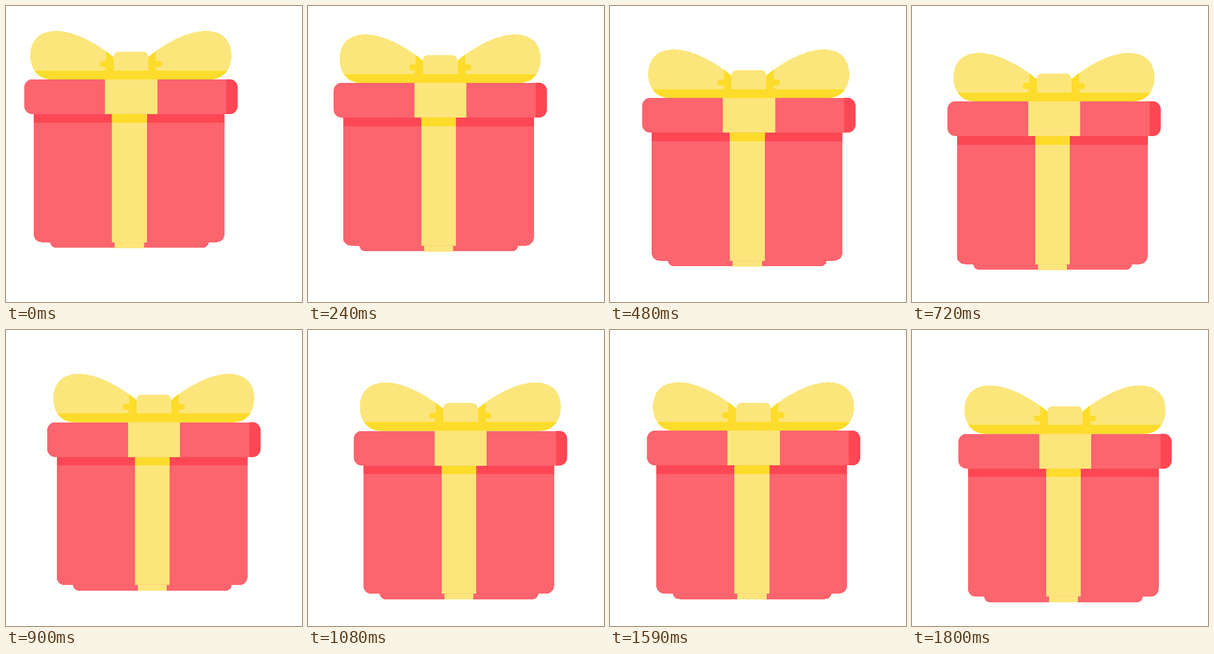
An HTML page that plays this animation: 512 px wide and 512 px high, repeating every 1.83 s.

```html
<!DOCTYPE html>
<html lang="en">
<head>
<meta charset="utf-8">
<title>Gift box</title>
<style>
  html, body { margin: 0; width: 100%; height: 100%; overflow: hidden; background: #fff; }
  svg { display: block; width: 100vw; height: 100vh; shape-rendering: crispEdges; }
  .red { fill: #fc646e; }
  .deep-red { fill: #fd4754; }
  .gold { fill: #fce67c; }
  .deep-gold { fill: #fddc2b; }
  .seam { fill: none; stroke: #fcd578; stroke-width: 1; }
</style>
</head>
<body>
<svg viewBox="0 0 512 512">
  <defs>
    <path id="loop" d="M218 127H79C55 127 42 108 42 86C42 60 57 43 87 43C119 43 161 67 186 88.500L218 100Z"/>
    <clipPath id="loopClip"><use href="#loop"/></clipPath>
    <clipPath id="lidClip"><rect x="31.600" y="126.800" width="369" height="60.200" rx="14"/></clipPath>
    <g id="wing">
      <use href="#loop" class="gold"/>
      <g clip-path="url(#loopClip)" class="deep-gold">
        <rect x="40" y="111.600" width="180" height="16"/>
        <path d="M173 70H187V113H168Q173 111 173 106Z"/>
        <rect x="162" y="95" width="24" height="10.500" rx="5"/>
      </g>
    </g>
  </defs>
  <g id="gift">
    <path class="red" d="M76 405H351Q351 418.300 339 418.300H88Q76 418.300 76 405Z"/>
    <rect class="red" x="48" y="160" width="330" height="248.600" rx="14"/>
    <rect class="deep-red" x="48" y="187" width="330" height="14.600"/>
    <rect class="gold" x="188" y="408" width="50.500" height="10.600"/>
    <rect class="gold" x="183" y="187" width="60.500" height="221.600"/>
    <rect class="deep-gold" x="183" y="187" width="60.500" height="14.600"/>
    <path class="seam" d="M183.500 202V408.100H243V202"/>
    <g clip-path="url(#lidClip)">
      <rect class="red" x="31" y="127" width="371" height="60"/>
      <rect class="deep-red" x="381" y="126" width="21" height="61"/>
    </g>
    <use href="#wing"/>
    <use href="#wing" transform="matrix(-1 0 0 1 432 0)"/>
    <path class="gold" d="M186 111.600V89.800Q186 78.800 197 78.800H235Q246 78.800 246 89.800V111.600Z"/>
    <rect class="gold" x="171" y="127" width="90.500" height="60"/>
    <path class="seam" d="M171.500 127V186.500H261V127"/>
  </g>
</svg>
<script>
  const LOOP = 1830, STEP = 30;
  // Turning points of the drift: time in ms, then x and y.
  const path = [
    [0, 0, 0], [120, 5, -4], [240, 12.6, 6], [480, 24, 32], [600, 26.5, 41], [720, 29.6, 38],
    [870, 38, 31.5], [1080, 47.6, 47.6], [1350, 35.6, 57], [1440, 29.4, 58.5],
    [1650, 35, 44.5], [1800, 48.6, 52.8]
  ];

  function slope(i, axis) {
    const a = path[Math.max(i - 1, 0)], b = path[Math.min(i + 1, path.length - 1)];
    return (b[axis] - a[axis]) / (b[0] - a[0]);
  }

  // Smooth curve through the points.
  function at(t, axis) {
    const i = Math.max(path.findIndex(p => p[0] >= t), 1) - 1;
    const a = path[i], b = path[i + 1];
    const span = b[0] - a[0], u = (t - a[0]) / span, v = 1 - u;
    return (1 + 2 * u) * v * v * a[axis] + u * u * (3 - 2 * u) * b[axis]
      + span * u * v * (v * slope(i, axis) - u * slope(i + 1, axis));
  }

  const gift = document.getElementById("gift");
  const start = performance.now();

  function draw() {
    const elapsed = (performance.now() - start) % LOOP;
    const t = Math.floor(elapsed / STEP) * STEP;
    gift.setAttribute("transform", `translate(${at(t, 1).toFixed(2)} ${at(t, 2).toFixed(2)})`);
    requestAnimationFrame(draw);
  }
  draw();
</script>
</body>
</html>
```
